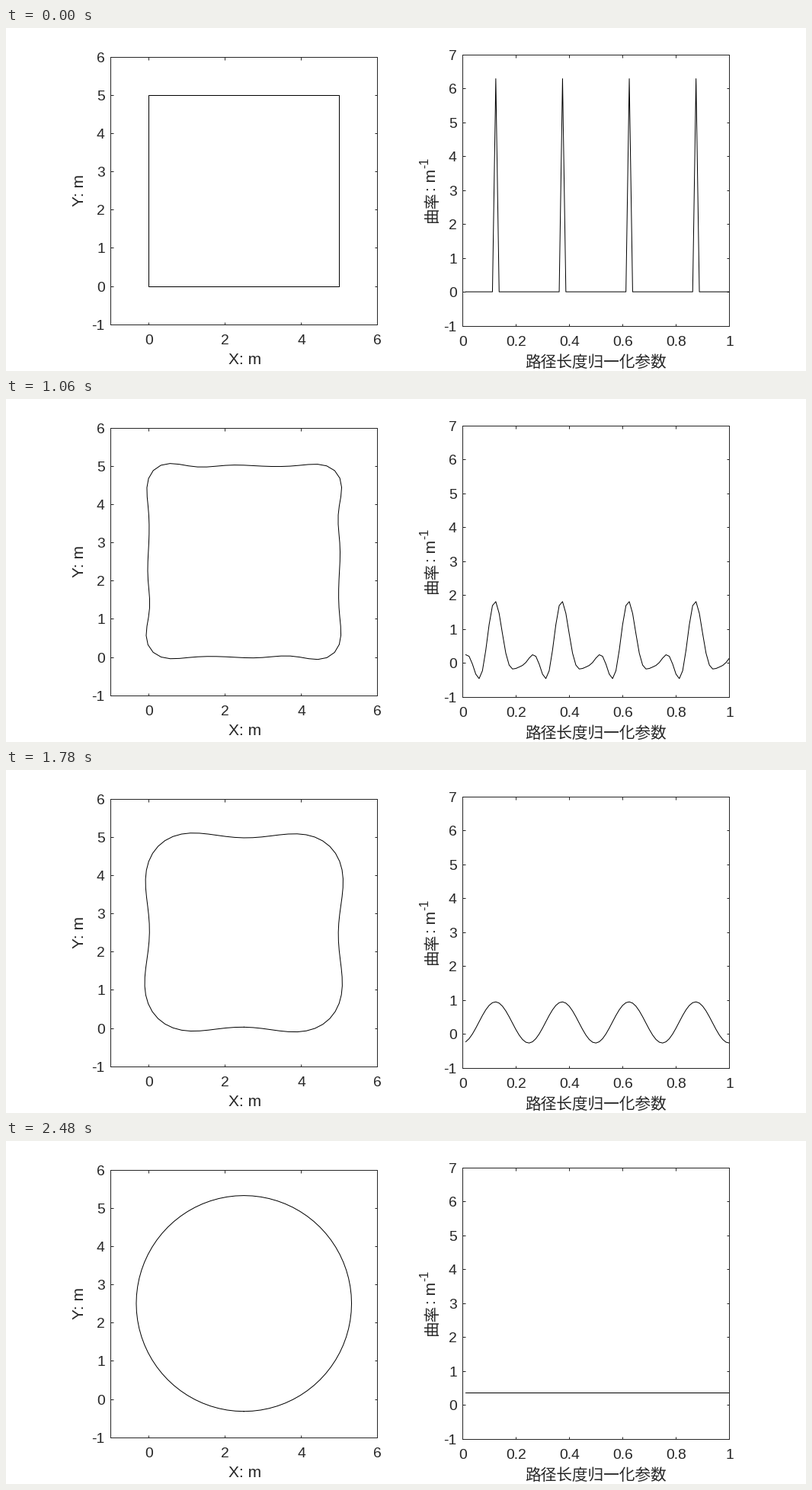
These frames come from a looping animation (1050x450 px, 2.5 s). A matplotlib script:

```python
import numpy as np
import matplotlib.pyplot as plt
from matplotlib.animation import FuncAnimation

W, H, DPI = 1050, 450, 100
PX = 72 / DPI
INK = "#262626"
SANS, CJK = "Liberation Sans", "Noto Sans CJK JP"

N = 80                      # path points
PERIOD = N // 4             # points per side
HOLD, STEPS, INTERVAL = 25, 100, 20
AREA = 25
# number of curvature harmonics still present at each step
KNOT_STEP = [0, 4, 8, 14, 29, 48, 65, 84, 100]
KNOT_LEVEL = [10, 6, 4, 2.65, 2.36, 1.355, 0.905, 0.275, 0]


def turning_angles(step):
    """Turn at each vertex of a square whose harmonics fade out from the top."""
    level = np.interp(step, KNOT_STEP, KNOT_LEVEL)
    u = 2 * np.pi * (np.arange(N) - PERIOD // 2) / PERIOD
    total = np.ones(N)
    for m in range(1, PERIOD // 2 + 1):
        amp = np.clip(level - (m - 1), 0, 1)
        weight = 1 if m == PERIOD // 2 else 2
        total += weight * amp * np.cos(m * (u + 0.34 * (1 - amp)))
    return 2 * np.pi / N * total


def path_and_curvature(step):
    turn = turning_angles(step)
    heading = np.cumsum(turn)
    heading += np.pi / 4 - heading[:PERIOD].mean()
    z = np.concatenate([[0], np.cumsum(np.exp(1j * heading))])
    z -= z[:-1].mean()
    area = 0.5 * np.sum((np.conj(z[:-1]) * z[1:]).imag)
    ds = np.sqrt(AREA / area)
    return z * ds + 2.5 + 2.5j, np.roll(turn, -1) / ds


fig = plt.figure(figsize=(W / DPI, H / DPI), dpi=DPI, facecolor="white")


def label(x, y, text, size, ha="center", rotation=0, font=SANS):
    """Text with its baseline anchor at pixel (x, y), y downwards."""
    fig.text(x / W, 1 - y / H, text, fontsize=size * PX, family=font,
             color=INK, ha=ha, va="baseline", rotation=rotation,
             rotation_mode="anchor")


def make_axes(left, top, right, bottom, xlim, ylim, xticks):
    ax = fig.add_axes([left / W, 1 - bottom / H,
                       (right - left) / W, (bottom - top) / H])
    ax.set(xlim=xlim, ylim=ylim, xticks=xticks,
           yticks=range(ylim[0], ylim[1] + 1))
    ax.tick_params(direction="in", length=3.5 * PX, width=PX, color=INK,
                   top=True, right=True, labelbottom=False, labelleft=False)
    for spine in ax.spines.values():
        spine.set(linewidth=PX, color=INK)
    for v in xticks:
        x = left + (v - xlim[0]) / (xlim[1] - xlim[0]) * (right - left)
        label(x + 0.4, bottom + 26.4, f"{v:g}", 19.3)
    for v in range(ylim[0], ylim[1] + 1):
        y = bottom - (v - ylim[0]) / (ylim[1] - ylim[0]) * (bottom - top)
        label(left - 7.2, y + 7, str(v), 19.3, ha="right")
    line, = ax.plot([], [], color="black", linewidth=PX)
    return line


# edges sit just off the half pixel so that they snap to the intended column
path_line = make_axes(137.05, 37.6, 487.45, 388.7, (-1, 6), (-1, 6),
                      [0, 2, 4, 6])
curv_line = make_axes(599.05, 34.6, 949.45, 390.6, (0, 1), (-1, 7),
                      [0, 0.2, 0.4, 0.6, 0.8, 1])

label(313.3, 441, "X: m", 21)
label(102.5, 213, "Y: m", 21, rotation=90)
label(774.5, 445, "路径长度归一化参数", 20.7, font=CJK)
label(564.5, 254.5, "曲率", 20.7, ha="left", rotation=90, font=CJK)
label(564.5, 214, ": m", 21, ha="left", rotation=90)
label(554, 184.5, "-1", 16, ha="left", rotation=90)

s = np.arange(1, N + 1) / N


def update(i):
    z, curvature = path_and_curvature(max(0, i - HOLD + 1))
    path_line.set_data(z.real, z.imag)
    curv_line.set_data(s, curvature)
    return path_line, curv_line


anim = FuncAnimation(fig, update, frames=HOLD + STEPS, interval=INTERVAL,
                     repeat=True, repeat_delay=0)
plt.show()
```
